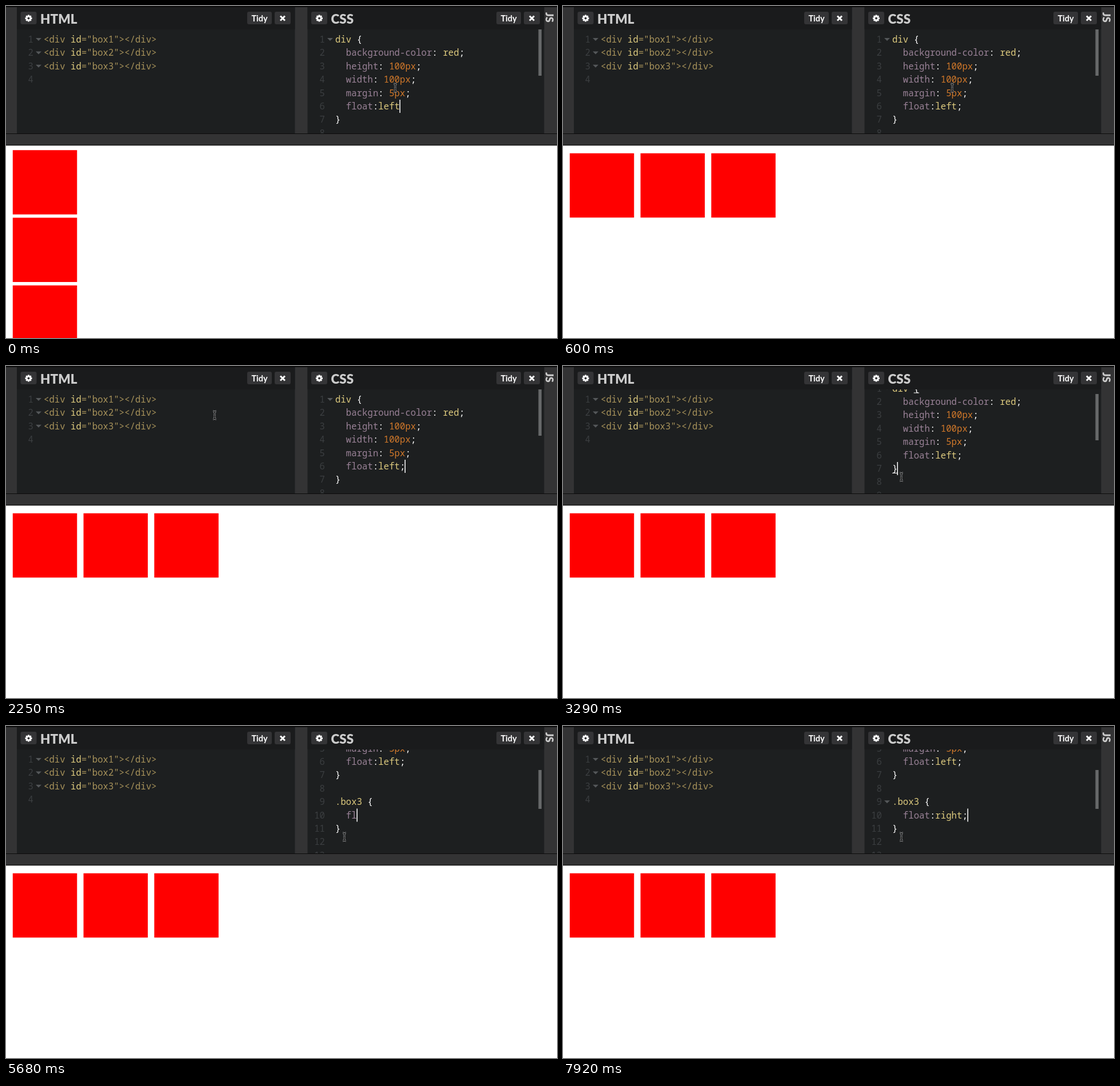
These frames come from a looping animation (964 px wide and 581 px high, 8 s). An HTML page with a canvas:

```html
<!DOCTYPE html>
<html lang="en">
<head>
<meta charset="utf-8">
<title>Floating boxes</title>
<style>
  html, body { margin: 0; width: 100%; height: 100%; overflow: hidden; background: #fff; }
  canvas { display: block; }
</style>
</head>
<body>
<canvas id="stage" width="964" height="581"></canvas>
<script>
const ctx = document.getElementById('stage').getContext('2d');
const LOOP = 8000, CHAR = 9.42, LINE = 23.4;
const MONO = '15.7px "Noto Sans Mono", monospace';
const C = {
  panel: '#1d1f20', head: '#1a1b1c', bar: '#333334', button: '#343436', edge: '#0b0b0b',
  tag: '#a7925a', name: '#ddca7e', string: '#96b38a', number: '#d0782a',
  prop: '#9a8297', plain: '#ffffff', gutter: '#3b3e40', fold: '#55585a', title: '#cccccc'
};

const markup = [1, 2, 3].map(n => `<div id="box${n}"></div>`).concat('');
const rule = ['div {', '  background-color: red;', '  height: 100px;', '  width: 100px;', '  margin: 5px;'];

// Each step overrides part of the state from its time on.
// caret: [line, column], tail: text from line 9 on, thumb: [top, height]
const steps = [
  [0, { float: '  float:left', caret: [5, 12], blink: 1, mouse: [681, 143], floated: false,
        tail: '', scroll: 0, thumb: [41, 81], folded: false }],
  [150, { float: '  float:left;', caret: [5, 13] }],
  [600, { floated: true, blink: 0 }],
  [750, { mouse: [689, 176] }],
  [900, { mouse: [703, 252] }],
  [1050, { mouse: [715, 335], blink: 1 }],
  [1200, { mouse: [722, 400] }],
  [1650, { mouse: [899, 520], blink: 0 }],
  [1800, { mouse: [768, 232] }],
  [2100, { mouse: [480, 128], blink: 1 }],
  [2250, { mouse: [365, 86] }],
  [2390, { mouse: [303, 108] }],
  [2540, { mouse: [470, 162] }],
  [2690, { mouse: [592, 194], blink: 0 }],
  [2990, { caret: [6, 1], blink: 1, scroll: 19.5, thumb: [49, 81] }],
  [3890, { caret: [8, 0], scroll: 66.3, thumb: [64, 74] }],
  [4190, { tail: '.', caret: [8, 1] }],
  [4330, { tail: '.b', caret: [8, 2] }],
  [4480, { tail: '.bo', caret: [8, 3] }],
  [4630, { tail: '.box', caret: [8, 4] }],
  [4930, { tail: '.box3', caret: [8, 5] }],
  [5080, { tail: '.box3 ', caret: [8, 6] }],
  [5230, { tail: '.box3 {}', caret: [8, 7] }],
  [5380, { tail: '.box3 {\n  \n}', caret: [9, 2], scroll: 113, thumb: [77, 68] }],
  ...[[5680, 'fl'], [5830, 'flo'], [5980, 'float'], [6280, 'float:'], [6430, 'float:ri'],
      [6570, 'float:rig'], [6720, 'float:right'], [6870, 'float:right;']].map(([time, text]) =>
    [time, { tail: `.box3 {\n  ${text}\n}`, caret: [9, 2 + text.length] }]),
  [7470, { blink: 0, folded: true }],
  [7920, { blink: 1 }]
];

function stateAt(time) {
  return Object.assign({}, ...steps.filter(s => s[0] <= time).map(s => s[1]));
}

function rect(color, x, y, w, h, radius = 0) {
  ctx.fillStyle = color;
  ctx.beginPath();
  ctx.roundRect(x, y, w, h, radius);
  ctx.fill();
}

function text(str, x, y, color, font = MONO, align = 'left') {
  ctx.font = font;
  ctx.textAlign = align;
  ctx.fillStyle = color;
  ctx.fillText(str, x, y);
}

function path(points, fill) {
  ctx.beginPath();
  points.forEach(([x, y]) => ctx.lineTo(x, y));
  ctx.closePath();
  ctx.fillStyle = fill;
  ctx.fill();
}

function htmlColor(token, index) {
  if (token === 'id') return C.name;
  if (token === '=') return C.plain;
  return token[0] === '"' ? C.string : C.tag;
}

function cssColor(token, index, line) {
  if (/^[{}:;]/.test(token)) return C.plain;
  if (/^\d/.test(token)) return C.number;
  return line[0] === ' ' && index === 2 ? C.prop : C.name;
}

function codeLine(line, row, x, y, pattern, colorOf, hasFold) {
  text(row + 1, x - 18, y, C.gutter, MONO, 'right');
  if (hasFold) path([[x - 14, y - 8], [x - 4, y - 8], [x - 9, y - 3]], C.fold);
  for (const m of line.matchAll(pattern))
    text(m[0], x + m.index * CHAR, y, colorOf(m[0], m.index, line));
}

function clipped(x, y, w, h, draw) {
  ctx.save();
  ctx.beginPath();
  ctx.rect(x, y, w, h);
  ctx.clip();
  draw();
  ctx.restore();
}

function gear(x, y) {
  ctx.save();
  ctx.translate(x, y);
  for (let i = 0; i < 4; i++) {
    rect('#fff', -1.5, -6, 3, 12);
    ctx.rotate(Math.PI / 4);
  }
  ctx.restore();
  rect('#fff', x - 4.5, y - 4.5, 9, 9, 4.5);
  rect(C.button, x - 2, y - 2, 4, 4, 2);
}

function cross(x, y) {
  ctx.strokeStyle = '#fff';
  ctx.lineWidth = 3;
  ctx.beginPath();
  for (const d of [-4, 4]) {
    ctx.moveTo(x - 4, y - d);
    ctx.lineTo(x + 4, y + d);
  }
  ctx.stroke();
}

function panel(title, left, right) {
  rect(C.panel, left, 2, right - left, 221);
  rect(C.head, left, 2, right - left, 39);
  rect(C.button, left + 6.5, 10, 28, 22, 3);
  gear(left + 20.5, 21.5);
  text(title, left + 41, 30.5, C.title, '900 22.5px Lato, sans-serif');
  rect(C.button, right - 83.5, 10, 43, 22, 3);
  text('Tidy', right - 62, 26.5, '#fff', 'bold 14.5px Lato, sans-serif', 'center');
  rect(C.button, right - 35.5, 10, 28, 22, 3);
  cross(right - 21.5, 21.5);
}

function pointer([x, y]) {
  if (y > 223) {
    const shape = [[0, 0], [0, 14], [3.3, 11], [5.4, 16], [7.6, 15], [5.5, 10.3], [10, 10.3]];
    path(shape.map(([dx, dy]) => [x + dx, y + dy]), '#000');
    ctx.strokeStyle = '#fff';
    ctx.lineWidth = 1;
    ctx.stroke();
    return;
  }
  for (const [color, width] of [['#8a8c8d', 3], ['#111', 1.2]]) {
    ctx.strokeStyle = color;
    ctx.lineWidth = width;
    ctx.beginPath();
    for (const s of [-1, 1]) {
      ctx.moveTo(x - 3, y + s * 7);
      ctx.quadraticCurveTo(x, y + s * 7, x, y + s * 4);
      ctx.quadraticCurveTo(x, y + s * 7, x + 3, y + s * 7);
    }
    ctx.moveTo(x, y - 5);
    ctx.lineTo(x, y + 5);
    ctx.moveTo(x - 2, y + 2);
    ctx.lineTo(x + 2, y + 2);
    ctx.stroke();
  }
}

function cssCode(s) {
  const lines = [...rule, s.float, '}', '', ...s.tail.split('\n')];
  const baseline = row => 64 + row * LINE - s.scroll;
  const mark = (row, col) => rect('#fff', 576 + col * CHAR, baseline(row) + 2, CHAR, 1);
  for (let row = 0; row < 14; row++)
    codeLine(lines[row] || '', row, 576, baseline(row), /[\w.-]+|\S/g, cssColor,
      row === 0 || (row === 8 && s.folded));
  const [row, col] = s.caret;
  if (row === 6) { mark(0, 4); mark(6, 0); }
  if (lines[row].endsWith('{}')) { mark(row, col - 1); mark(row, col); }
  if (s.blink) rect('#fff', Math.round(576 + col * CHAR) - 0.5, baseline(row) - 17, 1.5, 23);
}

function draw(time) {
  const s = stateAt(time);
  rect('#fff', 0, 0, 964, 581);
  rect(C.bar, 0, 0, 964, 244);
  rect(C.edge, 0, 0, 964, 2);
  panel('HTML', 19, 505.5);
  panel('CSS', 527.5, 941.5);
  rect(C.edge, 0, 223, 964, 1);
  rect(C.edge, 0, 243, 964, 1.3);

  ctx.save();
  ctx.translate(944, 11);
  ctx.rotate(Math.PI / 2);
  text('JS', 0, 0, C.title, '900 18px Lato, sans-serif');
  ctx.restore();

  markup.forEach((line, row) =>
    codeLine(line, row, 66, 64 + row * LINE, /"\w+"|[<>/]*div>?|\w+|\S+/g, htmlColor, row < 3));
  clipped(528, 41, 413, 182, () => cssCode(s));
  rect('#666869', 931.5, s.thumb[0], 5.5, s.thumb[1]);

  for (let i = 0; i < 3; i++)
    rect('#f00', s.floated ? 11.8 + i * 123.8 : 11.8, s.floated ? 257.8 : 252.2 + i * 118.4, 112.5, 112.5);
  pointer(s.mouse);
}

function tick() {
  draw(performance.now() % LOOP);
  requestAnimationFrame(tick);
}
tick();
</script>
</body>
</html>
```
